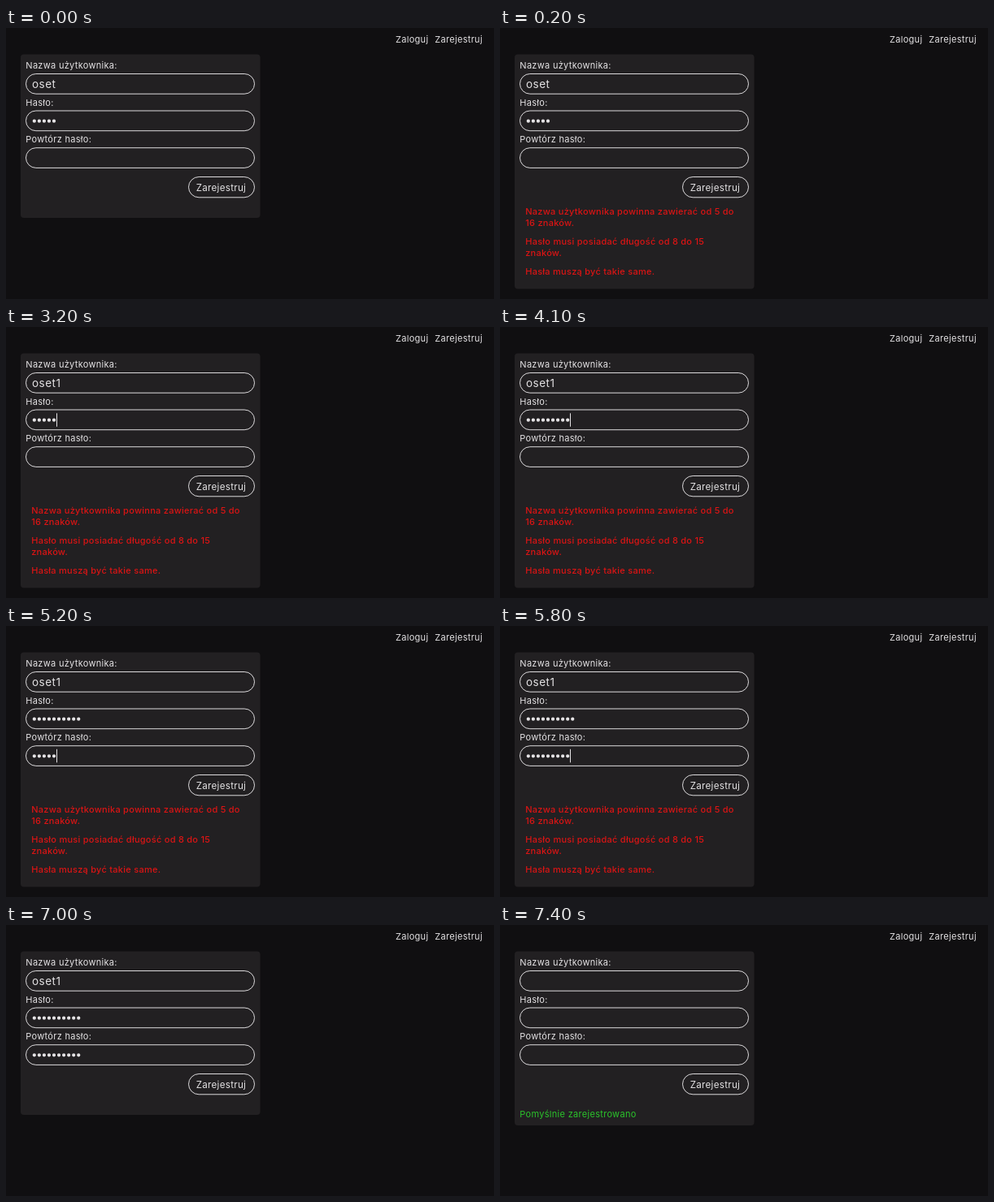
An HTML page that plays this animation: 600x334 px, repeating every 8100 ms.

```html
<!DOCTYPE html>
<html lang="pl">
<head>
<meta charset="utf-8">
<title>Rejestracja</title>
<style>
  html, body { margin: 0; width: 100%; height: 100%; overflow: hidden; background: #100f11; }
  svg { display: block; font: 11px Inter, sans-serif; letter-spacing: .3px; fill: #e4e2e4; }
  .box { fill: none; stroke: #dcdadc; }
  .value { font-size: 13.5px; letter-spacing: .5px; }
  .button { font-size: 11.6px; }
  .dots { stroke: #e4e2e4; stroke-width: 4.3; stroke-linecap: round; stroke-dasharray: 0 6.05; }
  #errors { fill: #db1414; font-weight: 500; letter-spacing: .26px; }
  #success { fill: #2bc42b; }
</style>
</head>
<body>
<svg width="600" height="334" viewBox="0 0 600 334">
  <text x="479" y="17.8">Zaloguj</text>
  <text x="527.3" y="17.8">Zarejestruj</text>
  <rect id="panel" x="18" y="32.5" width="294.5" rx="4" fill="#222022"/>

  <text x="24.3" y="50">Nazwa użytkownika:</text>
  <text x="24.3" y="95.5">Hasło:</text>
  <text x="24.3" y="141.2">Powtórz hasło:</text>
  <g class="box">
    <rect x="24.5" y="56.5" width="281" height="24.7" rx="12.35"/>
    <rect x="24.5" y="102" width="281" height="24.7" rx="12.35"/>
    <rect x="24.5" y="147.7" width="281" height="24.7" rx="12.35"/>
    <rect x="224.5" y="183.5" width="81" height="25.3" rx="12.65"/>
  </g>
  <text class="button" x="233.7" y="200.6">Zarejestruj</text>

  <text id="login" class="value" x="32" y="74"></text>
  <path id="password" class="dots"/>
  <path id="repeat" class="dots"/>
  <rect id="caret" width="1" height="16.5"/>

  <g id="errors">
    <text x="31.2" y="230.2">Nazwa użytkownika powinna zawierać od 5 do</text>
    <text x="31.2" y="243.6">16 znaków.</text>
    <text x="31.2" y="267.4">Hasło musi posiadać długość od 8 do 15</text>
    <text x="31.2" y="280.8">znaków.</text>
    <text x="31.2" y="304.4">Hasła muszą być takie same.</text>
  </g>
  <text id="success" x="24.3" y="237.3">Pomyślnie zarejestrowano</text>
</svg>
<script>
const LOOP = 8100, PITCH = 6.05;
const $ = id => document.getElementById(id);
const show = (id, on) => $(id).setAttribute('visibility', on ? 'visible' : 'hidden');

const initial = { login: 'oset', password: 5, repeat: 0, focus: '', message: '' };
const steps = [
  [200, { message: 'errors' }],
  [1800, { focus: 'login' }],
  [2100, { login: 'oset1' }],
  [2600, { focus: '' }],
  [3200, { focus: 'password' }],
  ...[3500, 3700, 3900, 4100, 4200].map((t, i) => [t, { password: 6 + i }]),
  [4400, { focus: 'repeat' }],
  ...[4700, 4800, 5000, 5100, 5200, 5300, 5500, 5600, 5800, 5900].map((t, i) => [t, { repeat: 1 + i }]),
  [6400, { focus: '' }],
  [6900, { focus: 'repeat' }],
  [7000, { focus: '', message: '' }],
  [7200, { login: '', password: 0, repeat: 0, message: 'success' }],
];
const panelBottom = { '': 234, errors: 321.5, success: 247 };
const caretTop = { login: 60.5, password: 106.3, repeat: 151.8 };

function drawDots(id, count, y) {
  $(id).setAttribute('d', count ? `M34.8 ${y}h${(count - 1) * PITCH + .1}` : '');
}

function render(time) {
  const state = Object.assign({}, initial, ...steps.filter(([t]) => t <= time).map(([, change]) => change));
  const { login, password, repeat, focus, message } = state;

  $('login').textContent = login;
  drawDots('password', password, 114.7);
  drawDots('repeat', repeat, 160.3);
  $('panel').setAttribute('height', panelBottom[message] - 32.5);
  show('errors', message === 'errors');
  show('success', message === 'success');
  show('caret', focus);
  if (focus) {
    const width = focus === 'login' ? $('login').getComputedTextLength() : state[focus] * PITCH;
    $('caret').setAttribute('x', Math.round(32 + width));
    $('caret').setAttribute('y', caretTop[focus]);
  }
}

const start = performance.now();
(function tick() {
  render((performance.now() - start) % LOOP);
  requestAnimationFrame(tick);
})();
</script>
</body>
</html>
```
